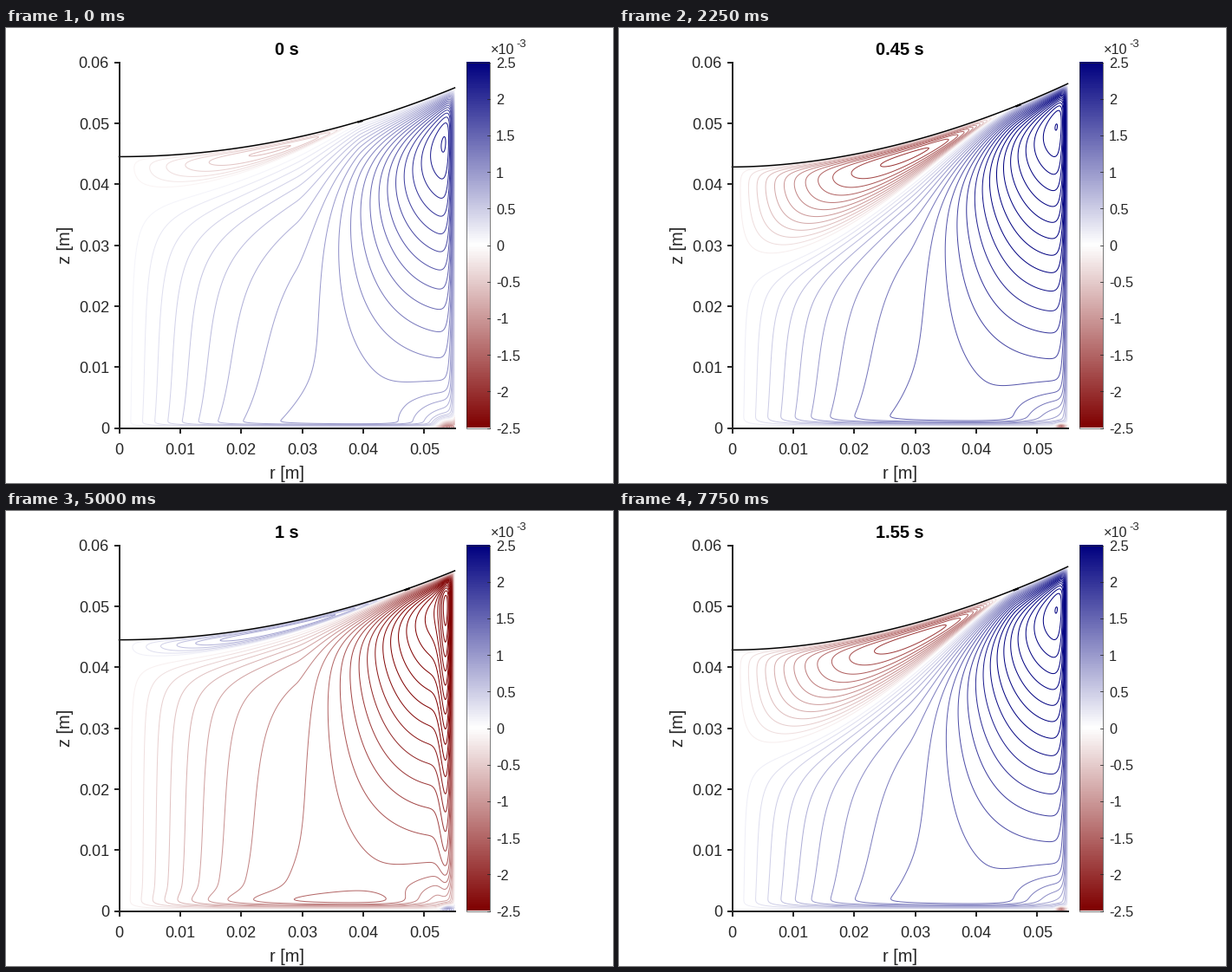
Animation of 700x525 px, one loop 8000 ms. Source, as a matplotlib script:

```python
import numpy as np
import matplotlib.pyplot as plt
from matplotlib.animation import FuncAnimation
from matplotlib.colors import LinearSegmentedColormap

plt.rcParams["font.family"] = "Liberation Sans"

W, H, DPI = 700, 525, 100
FRAMES, INTERVAL, DT = 32, 250, 0.05
LEFT, RIGHT, TOP, BOTTOM = 130.5, 517.5, 39.5, 461.5
R, ZMAX = 55.0, 60.0          # lengths in mm
PERIOD = 1.1
LIMIT = 2.5e-3
INK = (0.15, 0.15, 0.15)
CMAP = LinearSegmentedColormap.from_list(
    "flow", [(0.5, 0, 0), (1, 1, 1), (0, 0, 0.5)], N=256)

# Grid in relative radius and height, refined at the walls
u = np.linspace(0, 1, 240)
v = np.linspace(0, 1, 220)
X, Y = np.meshgrid(1 - (1 - u) ** 1.8, v - 0.8 * np.sin(2 * np.pi * v) / (2 * np.pi))


def px(r):
    return LEFT + r / R * (RIGHT - LEFT)


def py(z):
    return BOTTOM - z / ZMAX * (BOTTOM - TOP)


def surface(t, x):
    swing = 0.88 * np.cos(2 * np.pi * (t + 0.04) / PERIOD)
    centre, rim = 43.65 + swing, 56.15 - 0.4 * swing
    return centre + (rim - centre) * x ** (1.93 + 0.08 * swing)


def bump(s):
    return s ** 2 * np.exp(1 - s ** 2)


def state(t, **changes):
    """Flow parameters: amplitudes in contour steps, lengths in mm."""
    p = dict(t=t, step=1.6e-4,
             split=30.2, meet=45.5, curve=1.85, blend=3.5,   # dividing line
             core=9.9, jet=1.75, start=29.0, wall=0.4,       # main cell
             side=0.0, side_w=0.7,                           # wall layer
             base=0.0, base_w=0.8, floor=0.8,                # floor layer
             upper=15.5, skin=0.8, lift=1.0,                 # upper cell
             corner=10.0, corner_w=0.8)
    p.update(changes)
    return p


STATES = [
    state(0, step=1.1e-4, split=38.2, meet=39.5, curve=1.2, blend=6,
          floor=0.45, upper=9, skin=0.6, corner=14, corner_w=1.8),
    state(0.25),
    state(0.45, step=1.65e-4, split=26.5, meet=46.9, curve=1.75),
    state(0.65, step=1.38e-4, split=14.5, meet=46.5, curve=0.47, blend=4,
          core=10.3, jet=0.95, start=39, wall=1.2, side=-26, side_w=0.8,
          base=-6, floor=1.7, upper=13.5, corner=3),
    state(1.0, step=1.5e-4, split=41.2, meet=47.2, curve=1.2, blend=2.5,
          core=-9.8, jet=-1.6, side=-5, side_w=1.4, base=-0.7, base_w=1.8,
          upper=-11, skin=0.5, corner=-8, corner_w=1.2),
    state(1.2, step=1.35e-4, split=30.7, meet=41.5, curve=1.0, blend=4,
          jet=1.4, wall=1.3, side=14, side_w=0.8, base=2, base_w=0.7,
          floor=0.6, upper=18, skin=2.0, lift=1.15, corner=13, corner_w=1.6),
    state(1.35),
    state(1.55, step=1.58e-4, split=25.4, meet=46.5, curve=1.5),
]


def stream(p):
    """Stream function of one state on the relative grid."""
    h = surface(p["t"], X)
    r, z = X * R, Y * h
    d = R - r

    gap0 = surface(p["t"], 0) - p["split"]
    gap = gap0 * (1 - np.clip((r / p["meet"]) ** 2, 0, 1)) ** p["curve"]
    divide = h - gap

    # Main cell below the dividing line
    depth = np.clip(divide - z, 0, None) / (p["blend"] * (1 - 0.7 * X ** 4))
    below = 1 - 0.8 * np.exp(-depth) - 0.2 * np.exp(-depth / 4)
    floor = (1 - np.exp(-(z / p["floor"]) ** 2)) * (1 + 0.08 * np.exp(-z / 5))
    dip = 1 - 0.5 * np.exp(-(d / 8) ** 2 - (z / 5) ** 2)
    s = np.clip((r - p["start"]) / (53 - p["start"]), 0, 1)
    ramp = np.sin(np.pi / 2 * s) ** 1.7
    jet = p["jet"] * (np.clip(z - 4, 0, None) / 10) ** 1.43 * ramp
    main = p["core"] * np.tanh(r / 19) * dip + jet
    main = main * below * floor * (1 - np.exp(-d / p["wall"]))

    # Upper cell between the dividing line and the surface
    k = np.clip((z - divide) / np.maximum(gap, 0.01), 0, 1)
    close = 1 - np.exp(-(gap / (0.08 * gap0)) ** 1.5)
    upper = p["upper"] * np.tanh(r / 20) * close * (1 - (1 - k) ** 2.5)
    upper = upper * (1 - p["lift"] * np.exp(-(h - z) / p["skin"]))

    # Thin layers and the corner eddy
    side = p["side"] * bump(d / p["side_w"]) * Y ** 0.6
    side = side * (1 - np.exp(-(h - z) / 1.5))
    base = p["base"] * bump(z / p["base_w"]) * np.sin(np.pi * X ** 1.3)
    cw = p["corner_w"]
    eddy = p["corner"] * np.exp(-((d - 1.1) / cw) ** 2
                                - ((z - 0.3) / (0.65 * cw)) ** 2)
    return main - upper + side + base - eddy


TIMES = np.array([p["t"] for p in STATES])
MEETS = np.array([p["meet"] for p in STATES])
FIELDS = [stream(p) * p["step"] for p in STATES]
RATIOS = [p["step"] / np.ptp(f) for p, f in zip(STATES, FIELDS)]


def flow(t):
    """Blended stream function and contour step at time t."""
    i = min(np.searchsorted(TIMES, t + 1e-9, side="right") - 1, len(TIMES) - 2)
    a = (t - TIMES[i]) / (TIMES[i + 1] - TIMES[i])
    psi = (1 - a) * FIELDS[i] + a * FIELDS[i + 1]
    ratio = (1 - a) * RATIOS[i] + a * RATIOS[i + 1]
    return psi, np.ptp(psi) * ratio


fig = plt.figure(figsize=(W / DPI, H / DPI), dpi=DPI, facecolor="white")
ax = fig.add_axes([0, 0, 1, 1])


def pt(pixels):
    return pixels * 72 / DPI


def label(x, y, text, size, ha="center", va="center", **kw):
    kw.setdefault("color", INK)
    return ax.text(x, y, text, fontsize=pt(size), ha=ha, va=va, **kw)


def line(xs, ys, width, color=INK, **kw):
    return ax.plot(xs, ys, color=color, lw=pt(width), **kw)[0]


def draw_static():
    ax.imshow(np.linspace(1, -1, 256)[:, None], cmap=CMAP, vmin=-1, vmax=1,
              extent=(531, 558, BOTTOM, TOP), aspect="auto",
              interpolation="nearest")
    ax.set_xlim(0, W)
    ax.set_ylim(H, 0)
    ax.axis("off")

    axis = dict(zorder=5, solid_capstyle="projecting")
    line([LEFT, RIGHT], [BOTTOM, BOTTOM], 2, **axis)
    line([LEFT, LEFT], [TOP, BOTTOM], 2, **axis)
    for i in range(7):
        y = py(10 * i)
        line([LEFT - 5, LEFT], [y, y], 2, zorder=5)
        label(119, y + 0.5, f"{i / 100:g}", 18, ha="right", va="center_baseline")
        if i < 6:
            x = px(10 * i)
            line([x, x], [BOTTOM, BOTTOM + 5], 2, zorder=5)
            label(x, 492, f"{i / 100:g}", 18, va="baseline")
    label(324, 520, "r [m]", 20, va="baseline")
    label(68, 250, "z [m]", 20, rotation=90)

    line([531, 558, 558, 531, 531], [TOP, TOP, BOTTOM, BOTTOM, TOP], 0.6)
    for i in range(-5, 6):
        y = (TOP + BOTTOM) / 2 - i * (BOTTOM - TOP) / 10
        line([555, 558], [y, y], 0.8)
        label(565, y + 0.5, f"{i / 2:g}", 16.3, ha="left", va="center_baseline")
    label(559, 30, "×10", 16.3, ha="left", va="baseline")
    label(588.5, 22, "-3", 13, ha="left", va="baseline")


draw_static()
title = label(323.5, 31, "", 20, va="baseline", color="black", weight="bold")
top_line = line([], [], 1.5, "black", zorder=4)
mark = line([], [], 2.2, "black", zorder=4)
contours = None


def update(n):
    global contours
    if contours is not None:
        contours.remove()
    t = n * DT
    psi, step = flow(t)
    k = np.arange(-45, 46)
    levels = k[k != 0] * step
    levels = levels[(levels > psi.min()) & (levels < psi.max())]
    contours = ax.contour(px(X * R), py(Y * surface(t, X)), psi, levels=levels,
                          cmap=CMAP, vmin=-LIMIT, vmax=LIMIT,
                          linewidths=pt(1), linestyles="solid", zorder=3)

    x = np.linspace(0, 1, 120)
    top_line.set_data(px(x * R), py(surface(t, x)))
    x = (np.interp(t, TIMES, MEETS) + np.array([-0.3, 0.3])) / R
    mark.set_data(px(x * R), py(surface(t, x)) + 0.4)
    title.set_text(f"{t:.4g} s")
    return []


anim = FuncAnimation(fig, update, frames=FRAMES, interval=INTERVAL, repeat=True)
plt.show()
```
